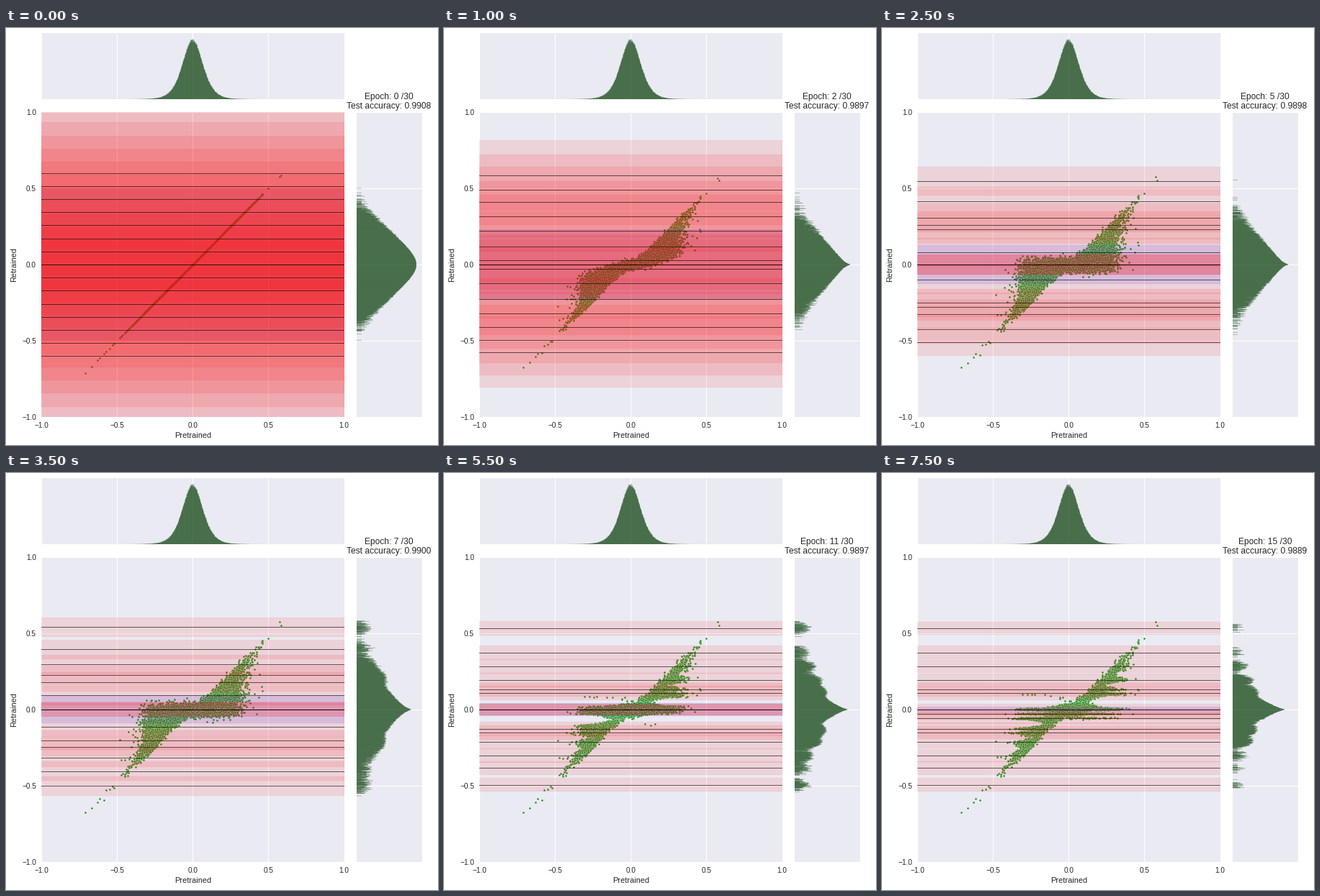
Write a matplotlib script that moves like this. It is 600 by 580 pixels and loops after 8 s.

```python
import numpy as np
import matplotlib.pyplot as plt
from matplotlib.animation import FuncAnimation
from matplotlib.collections import PolyCollection

W, H, DPI = 600, 580, 80
PX = 72 / DPI  # points per pixel
INK, PANEL = "0.15", "#eaeaf2"
EPOCHS = 16
BINS = np.linspace(-0.71, 0.583, 1001)
MIDS = (BINS[1:] + BINS[:-1]) / 2
RANK = np.arange(-7, 8)
TINTS = [(0, 0, 1, 0.1)] + [(1, 0, 0, 0.1)] * len(RANK)


def ramp(epoch, start, end):
    return np.clip((epoch - start) / (end - start), 0, 1)


def accuracy(epoch):
    keys = [0, 1, 3, 5, 9, 13, 15]
    return round(np.interp(epoch, keys, [9908, 9888, 9906, 9898, 9901, 9893, 9889]))


def mean_size(rank, epoch):
    """Distance of a component from zero; the inner ones merge into zero."""
    if rank == 0:
        return 0
    start = 0.6 * rank / 7
    path = [start, start - 0.031 + 0.0025 * rank]
    if rank == 1:
        path += [0, 0, 0]
    else:
        x = [2, 3, 4, 5, 6, 7]
        path += [np.interp(rank, x, [.097, .217, .315, .410, .487, .570]),
                 np.interp(rank, x, [.090, .241, .267, .316, .421, .527]),
                 np.interp(rank, x, [.117, .140, .202, .293, .379, .513])]
    return np.interp(epoch, [0, 1, 3, 5, 9], path)


def mixture(epoch):
    """Means and half widths; the first component is the fixed zero one."""
    size = np.array([mean_size(r, epoch) for r in abs(RANK)])
    skew = 0.03 * (abs(RANK) / 7) ** 12 - 0.01
    inner = abs(RANK) <= 1
    split = -0.028 * (1 - RANK) * ramp(epoch, 13, 15)
    means = size * np.sign(RANK)
    means += np.where(inner, split, skew * ramp(epoch, 1, 5))
    half = np.where(inner, 0.037 + 0.466 * np.exp(-epoch / 1.85),
                    0.043 + 0.46 * np.exp(-epoch / 2.25))
    zero_half = 0.33 * np.exp(-epoch / 5.3) + 0.17 * np.exp(-2 * epoch)
    return np.append(0, means), np.append(zero_half, half)


def make_weights():
    rng = np.random.default_rng(4)
    tail = rng.logistic(0, 0.042, 450_000)
    tail = tail[(abs(tail) > 0.26) & (tail > -0.53) & (tail < 0.47)]
    core = rng.uniform(-0.26, 0.26, 5500)
    x = rng.permutation(np.concatenate([tail, core]))
    drop = rng.random(x.size) ** (1.1 + (abs(x) / 0.3) ** 4)
    lone = [-.71, -.668, -.628, -.615, -.585, -.57, -.55, .5, .575, .583]
    x = np.append(x, lone)
    drop = np.append(drop, np.zeros(len(lone)))
    return x, drop, rng.normal(0, 0.018, x.size)


X0, DROP, JITTER = make_weights()


def retrained(epoch):
    """Weights slide off the diagonal, then gather at the nearest mean."""
    y = X0 * (1 - DROP * min(1, 0.35 * epoch))
    y = y - 0.03 * min(1, epoch) * np.tanh(X0 / 0.08)
    y = y + JITTER * ramp(epoch, 0, 3)
    means, _ = mixture(epoch)
    nearest = means[abs(y[:, None] - means).argmin(axis=1)]
    pull = 0.8 * ramp(epoch, 5, 13) ** 1.5
    return y + pull * np.minimum(1, DROP * abs(X0) / 0.13) * (nearest - y)


def bell(x):
    return 4450 / np.cosh(10.9 * x) ** 2.1


def density(epoch):
    if epoch == 0:
        return bell(MIDS)
    settle = ramp(epoch, 5, 13)
    size = abs(MIDS)
    rate = 10 ** (3.16 - 0.2 * settle - (8.2 + 9.8 * settle) * size
                  + 0.25 * np.exp(-size / 0.012))
    weight = settle + 10 * settle * (1 - settle)
    spread = 0.035 - 0.015 * settle
    for m in mixture(epoch)[0]:
        if abs(m) > 0.08:
            peak = weight * 10 ** np.clip(2.7 - 6.7 * abs(m), 0.35, 1.2)
            rate += peak * np.exp(-((MIDS - m) / spread) ** 2 / 2)
    return rate


def bars(length, sideways=False):
    keep = length > 0
    lo, hi, top = BINS[:-1][keep], BINS[1:][keep], length[keep]
    zero = np.zeros_like(top)
    pos = np.stack([lo, lo, hi, hi], axis=1)
    ext = np.stack([zero, top, top, zero], axis=1)
    return np.stack([ext, pos] if sideways else [pos, ext], axis=2)


def side_bars(epoch):
    counts = np.random.default_rng(100 + epoch).poisson(density(epoch))
    return bars(np.log10(np.maximum(counts, 1)), sideways=True)


def panel(left, top, right, bottom, xlim, ylim):
    ax = fig.add_axes([left / W, 1 - bottom / H, (right - left) / W, (bottom - top) / H],
                      facecolor=PANEL, xlim=xlim, ylim=ylim)
    ax.set_axisbelow(True)
    for spine in ax.spines.values():
        spine.set_visible(False)
    ax.tick_params(length=0, pad=7 * PX, labelsize=10 * PX, labelcolor=INK)
    ax.set(xticks=[], yticks=[])
    return ax


def label(x, y, text, size, **kw):
    return fig.text(x / W, 1 - y / H, text, fontsize=size * PX, color=INK, ha="center", **kw)


def add_bars(ax, verts):
    coll = PolyCollection(verts, facecolors=[(0, 0.22, 0)], linewidths=0, zorder=2)
    coll.set_snap(False)
    return ax.add_collection(coll, autolim=False)


plt.rcParams["font.family"] = "Liberation Sans"
fig = plt.figure(figsize=(W / DPI, H / DPI), dpi=DPI, facecolor="white")
UNIT, TICKS = (-1, 1), [-1, -0.5, 0, 0.5, 1]
LEFT, RIGHT, TOP, BOTTOM = 49, 469.6, 116.85, 541.1

joint = panel(LEFT, TOP, RIGHT, BOTTOM, UNIT, UNIT)
upper = panel(LEFT, 7, RIGHT, 99, UNIT, (0, 5000))
side = panel(487, TOP, 578, BOTTOM, (0, 4), UNIT)
joint.set(xticks=TICKS, yticks=TICKS)
upper.set_xticks(TICKS, labels=[])
side.set_yticks(TICKS, labels=[])
for ax, axis in ((joint, "both"), (upper, "x"), (side, "y")):
    ax.grid(axis=axis, color="white", lw=PX)

label(259.3, 567.5, "Pretrained", 11, va="center")
label(11.3, 329.5, "Retrained", 11, va="center", rotation=90)
head = label(532, 99, "", 12, va="baseline")
score = label(532, 112, "", 12, va="baseline")

add_bars(upper, bars(np.random.default_rng(1).poisson(bell(MIDS))))
side_hist = add_bars(side, side_bars(0))

dots = joint.scatter(X0, X0, s=8 * PX ** 2, color=(0, 0.5, 0),
                     edgecolors="white", linewidths=0.3 * PX, zorder=1)
bands = PolyCollection([], facecolors=TINTS, edgecolors=TINTS,
                       linewidths=0.3 * PX, zorder=1.5)
joint.add_collection(bands, autolim=False)
lines = [joint.axhline(0, color="black", alpha=0.6, lw=PX, zorder=2) for _ in TINTS]


def update(epoch):
    means, half = mixture(epoch)
    bands.set_verts([[(-1, m - h), (1, m - h), (1, m + h), (-1, m + h)]
                     for m, h in zip(means, half)])
    for line, m in zip(lines, means):
        line.set_ydata([m, m])
    dots.set_offsets(np.column_stack([X0, retrained(epoch)]))
    side_hist.set_verts(side_bars(epoch))
    head.set_text(f"Epoch: {epoch} /30")
    score.set_text(f"Test accuracy: 0.{accuracy(epoch)}")
    return [bands, dots, side_hist, head, score, *lines]


anim = FuncAnimation(fig, update, frames=EPOCHS, interval=500, repeat=True, repeat_delay=0)
plt.show()
```
